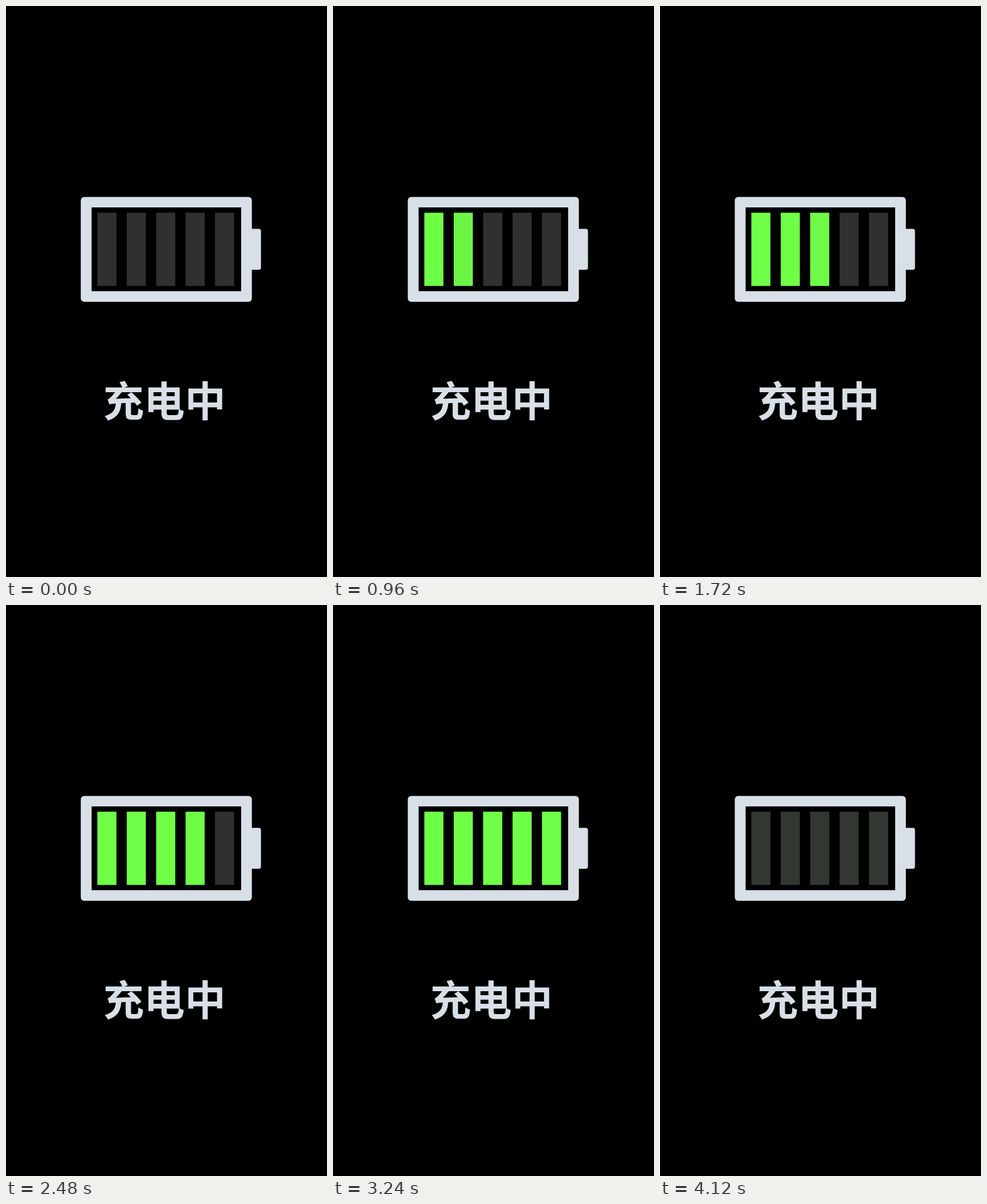
Animation, 561 px wide and 998 px high, one loop 5000 ms. Source, as an HTML page:

```html
<!DOCTYPE html>
<html lang="zh-CN">
<head>
<meta charset="utf-8">
<title>充电中</title>
<style>
  html, body { margin: 0; width: 100%; height: 100%; overflow: hidden; background: #000; }
  svg { display: block; width: 100%; height: 100%; }
  text { font: 700 71.4px "Noto Sans CJK SC", "Noto Sans CJK", sans-serif; }
</style>
</head>
<body>
<svg viewBox="0 0 561 998" xmlns="http://www.w3.org/2000/svg">
  <rect width="561" height="998" fill="#000"/>
  <g fill="#d8dfe6">
    <rect x="130.7" y="333.7" width="299" height="183.2" rx="6"/>
    <rect x="420" y="389.6" width="25.6" height="71.4" rx="4"/>
    <text x="169.7" y="716.7" lang="zh-CN">充电中</text>
  </g>
  <rect x="149.6" y="352" width="261.4" height="146.4" fill="#000"/>
  <g id="bars"></g>
</svg>
<script>
const LOOP = 5000, STEP = 40;
const EMPTY = [48, 48, 48], FULL = [112, 255, 71];
const STARTS = [40, 770, 1525, 2283, 3040];
const FADE_IN = 200, DRAIN_AT = 4004, DRAIN = 120;

const group = document.getElementById('bars');
const bars = STARTS.map((_, i) => {
  const bar = document.createElementNS('http://www.w3.org/2000/svg', 'rect');
  const box = { x: 159.6 + i * 51.4, y: 361.3, width: 33.4, height: 128 };
  for (const key in box) bar.setAttribute(key, box[key]);
  group.appendChild(bar);
  return bar;
});

const ramp = (t, start, length) => Math.min(1, Math.max(0, (t - start) / length));

function mix(k) {
  return `rgb(${EMPTY.map((c, i) => Math.round(c + (FULL[i] - c) * k))})`;
}

function draw(ms) {
  const t = Math.floor((ms % LOOP + 0.5) / STEP) * STEP;
  const left = 1 - ramp(t, DRAIN_AT, DRAIN);
  // a faint remainder glows until the loop restarts
  const rest = t >= DRAIN_AT ? 0.03 : 0;
  bars.forEach((bar, i) => {
    const level = ramp(t, STARTS[i], FADE_IN) * left;
    bar.setAttribute('fill', mix(Math.max(level, rest)));
  });
}

const begin = performance.now();
function tick() {
  draw(performance.now() - begin);
  requestAnimationFrame(tick);
}
draw(0);
requestAnimationFrame(tick);
</script>
</body>
</html>
```
